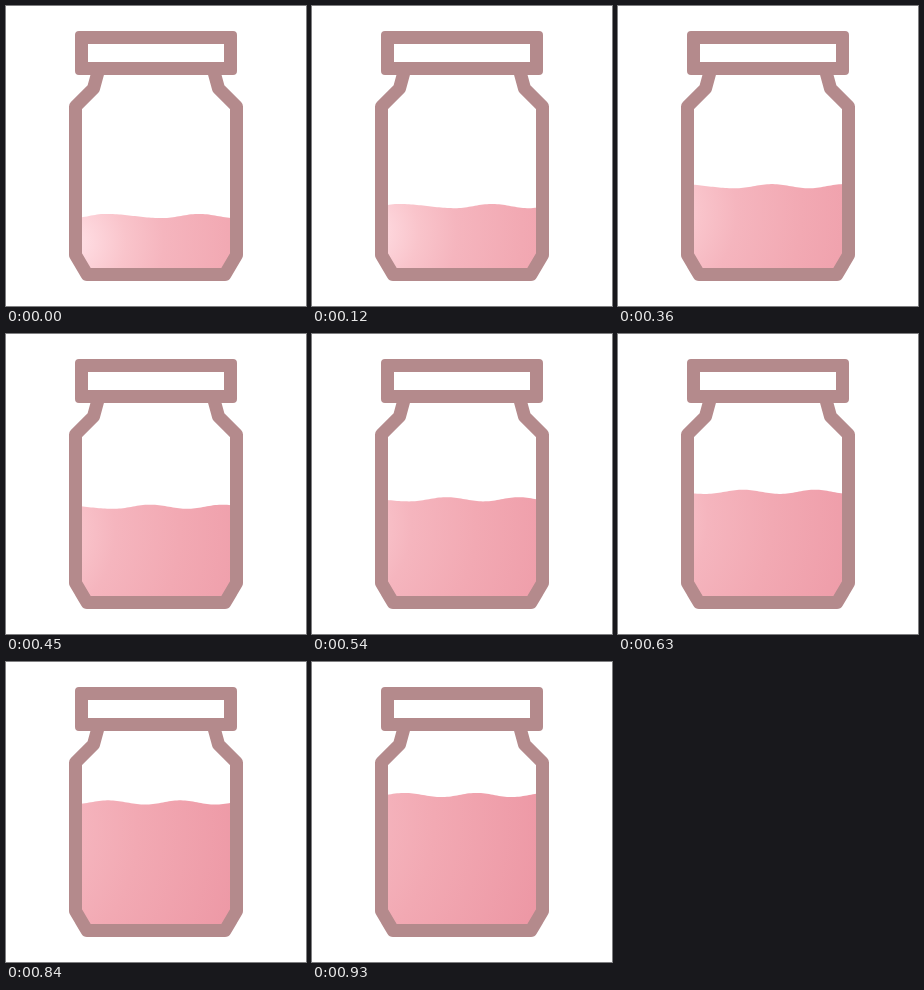
Animation, 300 px wide and 300 px high, one loop 0.96 s. Source, as an HTML page:

```html
<!DOCTYPE html>
<html lang="en">
<head>
<meta charset="utf-8">
<title>Filling jar</title>
<style>
html, body { margin: 0; width: 100%; height: 100%; overflow: hidden; background: #fff; }
svg { display: block; width: 100vw; height: 100vh; }
</style>
</head>
<body>
<svg viewBox="0 0 300 300">
  <defs>
    <radialGradient id="pink" gradientUnits="userSpaceOnUse" cx="66" cy="236" r="270">
      <stop offset="0" stop-color="#ffe1e6"/>
      <stop offset=".06" stop-color="#fed9df"/>
      <stop offset=".2" stop-color="#f9c4cb"/>
      <stop offset=".34" stop-color="#f5b5be"/>
      <stop offset=".58" stop-color="#f2a9b3"/>
      <stop offset="1" stop-color="#ed98a5"/>
    </radialGradient>
    <clipPath id="inside">
      <path d="M69.5 100.5V249L81 268.5H219L230.5 249V100.5Z"/>
    </clipPath>
  </defs>
  <path id="liquid" fill="url(#pink)" clip-path="url(#inside)"/>
  <path d="M92 66L87.5 82.5L69.5 100.5V249L81 268.5H219L230.5 249V100.5L212.5 82.5L208 66"
        fill="none" stroke="#b48a8c" stroke-width="13" stroke-linejoin="round"/>
  <path d="M73 25H227a4 4 0 0 1 4 4V65a4 4 0 0 1 -4 4H73a4 4 0 0 1 -4 -4V29a4 4 0 0 1 4 -4ZM82 38V56H218V38Z"
        fill="#b48a8c" fill-rule="evenodd"/>
</svg>
<script>
const LOOP = 960, STEP = 30;
const DRIFT = 0.108, RISE = 0.0828;   // px per ms
const AMP = 2.1, LEVEL = 210;
// alternating troughs and crests along the wave, trough first
const TURNS = [66, 100, 156, 193, 230, 265, 300, 335, 370];

const liquid = document.getElementById('liquid');
const pink = document.getElementById('pink');

function wave(x) {
  let i = 0;
  while (i < TURNS.length - 2 && x > TURNS[i + 1]) i++;
  const p = (x - TURNS[i]) / (TURNS[i + 1] - TURNS[i]);
  return AMP * Math.cos(Math.PI * (i + p));
}

function draw(t) {
  const dx = -DRIFT * t, dy = -RISE * t;
  let d = 'M69 275';
  for (let x = 69; x <= 231; x += 2) {
    d += `L${x} ${(LEVEL + dy + wave(x - dx)).toFixed(2)}`;
  }
  liquid.setAttribute('d', d + 'V275Z');
  pink.setAttribute('gradientTransform', `translate(${dx} ${dy})`);
}

function tick() {
  const t = performance.now() % LOOP;
  draw(Math.floor(t / STEP) * STEP);
  requestAnimationFrame(tick);
}

tick();
</script>
</body>
</html>
```
